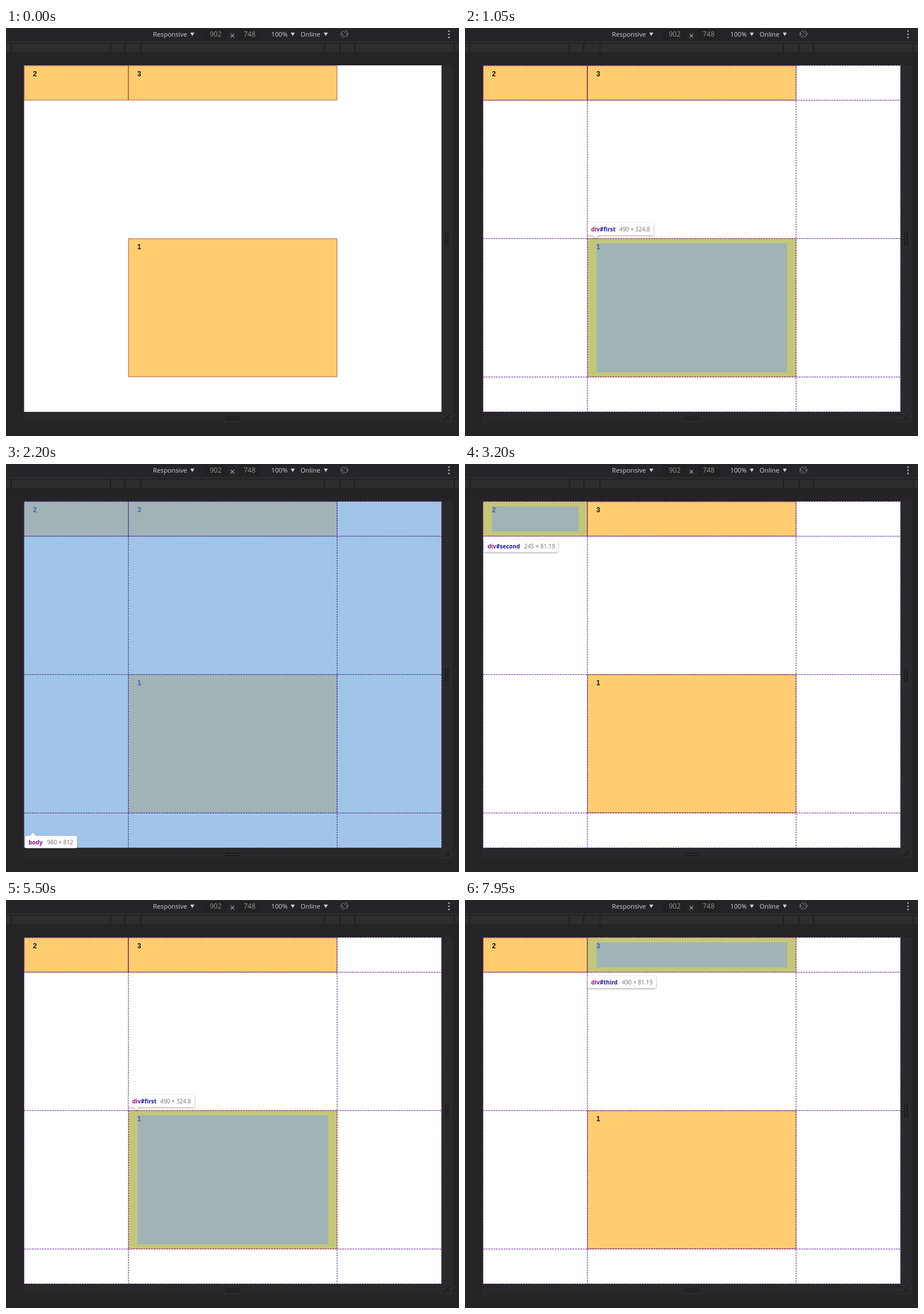
Animation, 789 px wide and 710 px high, one loop 8000 ms. Source, as an HTML page:

```html
<!DOCTYPE html>
<html>
<head>
<meta charset="utf-8">
<style>
html, body { margin: 0; width: 100%; height: 100%; overflow: hidden; background: #252326; }
svg { display: block; }
.ui { font: 11.25px "Open Sans", "Noto Sans", sans-serif; fill: #cfcfcf; }
.dim { font-size: 12px; fill: #959496; }
.num { font: bold 11.9px "Liberation Sans", Arial, sans-serif; }
.tip { font: 10px "Open Sans", "Noto Sans", sans-serif; filter: drop-shadow(0 1px 1.5px rgba(0,0,0,.4)); }
.name { font-weight: bold; }
</style>
</head>
<body>
<svg id="stage" width="789" height="710" viewBox="0 0 789 710"></svg>
<script>
const NS = 'http://www.w3.org/2000/svg';
const stage = document.getElementById('stage');

function add(parent, tag, attrs, text) {
  const el = document.createElementNS(NS, tag);
  for (const k in attrs) el.setAttribute(k, attrs[k]);
  if (text !== undefined) el.textContent = text;
  parent.appendChild(el);
  return el;
}
const rect = (p, x, y, r, b, fill, more) =>
  add(p, 'rect', { x, y, width: r - x, height: b - y, fill, ...more });
const path = (p, d, stroke, more) => add(p, 'path', { d, stroke, fill: 'none', ...more });
const label = (x, y, text, cls = 'ui') => add(stage, 'text', { x, y, class: cls }, text);

// Device toolbar
rect(stage, 0, 0, 789, 24, '#262428');
rect(stage, 344, 2, 387, 21, '#222023');
rect(stage, 405, 2, 444, 21, '#222023');
label(256, 15, 'Responsive');
label(355, 15.3, '902', 'ui dim');
label(414, 15.3, '748', 'ui dim');
label(462, 15, '100%');
label(513, 15, 'Online');
for (const x of [321, 496, 553.5]) add(stage, 'path', { d: `M${x} 8h7l-3.5 6z`, fill: '#cfcfcf' });
path(stage, 'M391.3 10.3l6 6m0-6l-6 6', '#b0b0b0', { 'stroke-width': 1.1 });
const spin = add(stage, 'g', { transform: 'translate(589.5 10.5) rotate(-45)', 'stroke-width': .9 });
rect(spin, -2.5, -5.5, 2.5, 5.5, 'none', { rx: 1, stroke: '#979698' });
path(spin, 'M-5 3.5A6.1 6.1 0 0 1-2.5-5.5M5-3.5A6.1 6.1 0 0 1 2.5 5.5', '#979698');
for (const cy of [5.5, 11, 16.5]) add(stage, 'circle', { cx: 771.5, cy, r: 1.4, fill: '#adadad' });

// Width ruler
rect(stage, 0, 24, 789, 43, '#201e21');
rect(stage, 0, 24, 789, 25, '#3a383b');
const marks = [-1, 9, 182, 207, 235, 555, 582, 607, 781, 790];
for (let i = 1; i < marks.length; i++) rect(stage, marks[i - 1] + 1, 27, marks[i] - 1, 42, '#2d2c2e');

// Resize handles
rect(stage, 758, 65, 778, 668, '#2a292b');
rect(stage, 31, 668, 758, 687, '#282729');
rect(stage, 758, 668, 778, 687, '#2a292b');
path(stage, 'M766 355v25M770 355v25M382 677.5h26M382 681.5h26M763 683l10-10M769 683l4-4', '#141315', { 'stroke-width': 1.2 });

// Page: a scaled grid, with 1px page lines becoming PX wide
const PX = .742;
const cols = [31.5, 213.2, 576.7, 758.5];
const rows = [65.5, 125.7, 366.4, 607.3, 667.8];
const cell = (c, r) => [cols[c], rows[r], cols[c + 1], rows[r + 1]];
const items = {
  second: { box: cell(0, 0), digit: 2 },
  third: { box: cell(1, 0), digit: 3 },
  first: { box: cell(1, 2), digit: 1 }
};
const layers = { body: [], first: [], second: [], third: [] };
const digits = {};
const BLUE = 'rgba(111,168,220,.66)', GREEN = 'rgba(147,196,125,.55)';
const PAD_X = 21 * PX, PAD_Y = 11 * PX;

const frame = (p, [x, y, r, b], fill, stroke) =>
  rect(p, x + PX / 2, y + PX / 2, r - PX / 2, b - PX / 2, fill, { stroke, 'stroke-width': PX });
const outline = ([x, y, r, b]) => `M${x} ${y}H${r}V${b}H${x}z`;

rect(stage, 31.5, 65, 758.5, 668, '#fff');
for (const id in items) frame(stage, items[id].box, '#ffcd70', '#a52a2a');

for (const id in items) {
  const box = items[id].box, [x, y, r, b] = box;
  const inner = [x + PAD_X, y + PAD_Y, r - PAD_X, b - PAD_Y];
  const g = add(stage, 'g', {});
  add(g, 'path', { d: outline([x + PX, y + PX, r - PX, b - PX]) + outline(inner), fill: GREEN, 'fill-rule': 'evenodd' });
  rect(g, ...inner, BLUE);
  frame(g, box, 'none', 'rgba(255,229,153,.66)');
  layers[id].push(g);
}
layers.body.push(rect(stage, 31.5, 65, 758.5, 668, BLUE));

for (const id in items) {
  const { box: [x, y], digit } = items[id];
  digits[id] = label(x + PAD_X, y + 18.4, digit, 'num');
}

// Grid overlay: every cell is outlined with its own dashes
let cells = '';
for (let r = 0; r < 4; r++)
  for (let c = 0; c < 3; c++) cells += outline(cell(c, r));
const grid = path(stage, cells, '#4b0082', { 'stroke-width': PX, 'stroke-dasharray': 3 * PX });

// Tooltips: left, top, width, arrow side, tag, id, size, size offset
function tip(key, x, y, w, down, tag, id, size, sizeX) {
  const g = add(stage, 'g', { class: 'tip' });
  const a = x + 8, h = 21.5;
  rect(g, x, y, x + w, y + h, '#fff', { rx: 2.5 });
  add(g, 'path', { d: down ? `M${a} ${y + h - .5}h12l-6 6z` : `M${a} ${y + .5}h12l-6-6z`, fill: '#fff' });
  const name = add(g, 'text', { x: x + 6.2, y: y + 14.7, class: 'name', fill: '#881280' }, tag);
  add(name, 'tspan', { fill: '#1a1aa6' }, id);
  add(g, 'text', { x: x + sizeX, y: y + 14.7, fill: '#707070' }, size);
  layers[key].push(g);
}
tip('first', 213.5, 339, 115, true, 'div', '#first', '490 × 324.8', 55.2);
tip('second', 33, 132, 129, false, 'div', '#second', '245 × 81.19', 70.2);
tip('third', 213.5, 132, 119.5, false, 'div', '#third', '490 × 81.19', 59.7);
tip('body', 33, 647, 91, false, 'body', '', '980 × 812', 38.8);

// Hovered element from each time on
const steps = [
  [0, ''], [400, 'third'], [500, 'second'], [600, 'first'], [1250, 'body'],
  [2850, 'first'], [2950, 'second'], [3300, 'first'], [5750, 'second'], [7250, 'third']
];
const LOOP = 8000;
const show = (el, on) => el.setAttribute('visibility', on ? 'visible' : 'hidden');

function draw() {
  const t = performance.now() % LOOP;
  const hover = steps.filter(s => s[0] <= t).pop()[1];
  for (const key in layers) layers[key].forEach(el => show(el, key === hover));
  for (const id in digits)
    digits[id].setAttribute('fill', hover === 'body' || hover === id ? '#4a62a5' : '#111');
  show(grid, hover !== '');
  requestAnimationFrame(draw);
}
draw();
</script>
</body>
</html>
```
